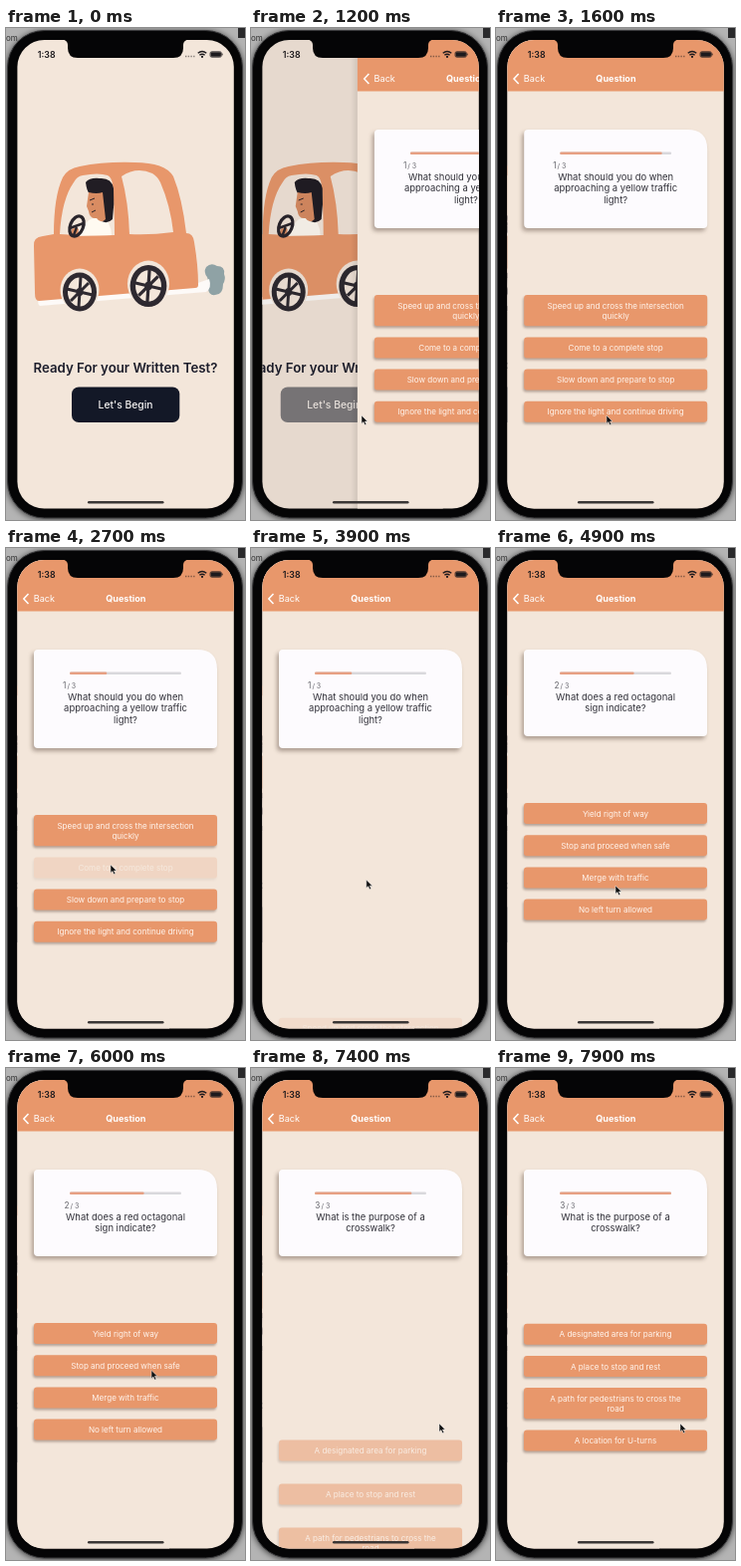
These frames come from a looping animation (240 px wide and 494 px high, 8 s). An HTML page:

```html
<!DOCTYPE html>
<html lang="en">
<head>
<meta charset="utf-8">
<title>Written test quiz</title>
<style>
  html, body { margin: 0; width: 100%; height: 100%; overflow: hidden; background: #b4b4b4; }
  svg { display: block; width: 240px; height: 494px; font-family: Inter, "Open Sans", sans-serif; }
  .mid { text-anchor: middle; }
  .answer rect { fill: #e8976b; filter: drop-shadow(-1px 2px 1.2px rgba(70, 40, 30, .35)); }
  .answer text { fill: #fff5ee; font-size: 8.05px; }
  .prompt { fill: #303038; font-size: 9.45px; }
  .count { fill: #66666c; font-size: 8.3px; }
  .card { fill: #fdfbfe; filter: drop-shadow(-1.5px 3px 2px rgba(60, 40, 30, .38)); }
  .phone { filter: drop-shadow(0 1px 3px rgba(0, 0, 0, .7)); }
</style>
</head>
<body>
<svg viewBox="0 0 240 494">
  <defs>
    <clipPath id="screen"><rect x="11.4" y="12" width="217.4" height="470.6" rx="27"/></clipPath>
    <linearGradient id="edge">
      <stop offset="0" stop-color="#000" stop-opacity="0"/>
      <stop offset="1" stop-color="#000" stop-opacity=".1"/>
    </linearGradient>
    <g id="wheel">
      <ellipse cy="-2" rx="19.5" ry="21.5" fill="#f3e6da"/>
      <ellipse rx="17" ry="19.5" fill="#2e2930"/>
      <ellipse rx="12" ry="14.5" fill="#f3e6da"/>
      <path d="M1-15L-1 15M-13-3L13 3M-9 9L9-9" stroke="#2e2930" stroke-width="3"/>
      <ellipse rx="3.5" ry="4" fill="#2e2930"/>
    </g>
  </defs>

  <rect width="240" height="494" fill="#b4b4b4"/>
  <text x="0" y="13" font-size="8" fill="#333">om</text>
  <rect x="233" width="7" height="10" fill="#29292b"/>
  <rect class="phone" x="1.5" y="2.5" width="236" height="489.5" rx="37" fill="#050506" stroke="#3a3a3c"/>

  <g clip-path="url(#screen)">
    <g id="home">
      <rect x="11" y="12" width="218" height="471" fill="#f3e6da"/>
      <path d="M201 240q5-5 11-1q8 0 7 8q2 5-1 10q0 11-8 11q-6 1-7-6l-3-5q4-3 2-7q-4-5-1-10z" fill="#8fa2a5"/>
      <path d="M33 272l26-3l131-12l14-5q3 9-3 13l-61 5l-106 9q-3-2-1-7z" fill="#fdfaf8"/>
      <path d="M28 219q-1-9 9-10l11-2q0-38 9-57q5-9 17-11q25-5 55-4q31 0 39 14q9 22 13 57q7 0 8 9q4 24 4 43q0 3-3 3l-157 13q-4 0-4-8z" fill="#e8976b"/>
      <path d="M54 207q2-35 14-52q3-6 9-7q16-3 25 0q4 2 5 9q2 24 2 51q-29 1-55-1z" fill="#f3e6da"/>
      <path d="M116 149q15-10 31-3q5 3 8 9q10 23 13 50q-23 3-44 2q-1-32-8-58z" fill="#f3e6da"/>
      <path d="M87 191q13-1 16 5q3 6 3 12l-38 1q2-8 10-9q3-7 9-9z" fill="#fffaf1"/>
      <path d="M80 155q4-5 14-4q12-1 14 10q1 16-1 31q-5 5-11 2l-5-24q-9 1-11-15z" fill="#211d24"/>
      <path d="M83 165q8 2 14 0l3 27q-5 5-9-1q-7 1-8-7l-2-5z" fill="#d98c62"/>
      <path d="M84 173l5-2M86 177h2M86 185l4-2" stroke="#2b2228" fill="none"/>
      <path d="M64 209l2-7q4-3 7 0l-1 8z" fill="#d98c62"/>
      <g fill="none" stroke="#29242b" stroke-width="3.2">
        <ellipse cx="71" cy="199" rx="6.5" ry="10.5" transform="rotate(22 71 199)"/>
        <path d="M64 201l14-5M71 200l-3 8" stroke-width="2.4"/>
      </g>
      <use href="#wheel" x="74" y="265"/>
      <use href="#wheel" transform="translate(143 259) scale(1.08)"/>
      <text class="mid" x="120" y="346" font-size="13.25" font-weight="600" fill="#1c1d2b">Ready For your Written Test?</text>
      <g id="begin">
        <rect x="66" y="360.5" width="108.3" height="35.5" rx="7" fill="#131827"/>
        <text class="mid" x="120" y="382.2" font-size="10.3" font-weight="500" fill="#f6f4f3">Let's Begin</text>
      </g>
    </g>
    <rect id="dim" x="11" y="12" width="218" height="471"/>

    <g id="quiz">
      <rect x="4" y="12" width="7.5" height="471" fill="url(#edge)"/>
      <rect x="11" y="12" width="218" height="471" fill="#f3e6da"/>
      <rect x="11" y="12" width="218" height="51.5" fill="#e8976b"/>
      <path d="M22.5 46l-4.7 5l4.7 5" fill="none" stroke="#fff" stroke-width="1.5"/>
      <g fill="#fff">
        <text x="27.7" y="54.3" font-size="9.1">Back</text>
        <text class="mid" x="120.3" y="54.3" font-size="9.1" font-weight="700">Question</text>
      </g>
      <g id="questions"></g>
      <rect x="64" y="124.5" width="112" height="2.6" rx="1.3" fill="#d9d8dc"/>
      <rect id="bar" x="64" y="124.5" height="2.6" rx="1.3" fill="#e7a083"/>
    </g>

    <g fill="#1d1a1d">
      <text x="31.8" y="29.6" font-size="8.8" font-weight="600">1:38</text>
      <path d="M180 28.5h10" stroke="#1d1a1d" stroke-opacity=".5" stroke-width="1.3" stroke-dasharray="1.4 1.3"/>
      <g fill="none" stroke="#1d1a1d" stroke-width="1.4">
        <path d="M192.7 25.3q4.3-3.6 8.6 0M194.4 27.3q2.6-2.2 5.2 0"/>
        <rect x="205" y="23.7" width="11.4" height="5.6" rx="1.7" stroke-width=".7"/>
      </g>
      <circle cx="197" cy="28.9" r="1.1"/>
      <rect x="205.5" y="24.2" width="10.4" height="4.6" rx="1"/>
      <path d="M217.2 25.6v1.8" stroke="#1d1a1d" stroke-width=".8"/>
      <rect x="82" y="475" width="76.5" height="2.6" rx="1.3" fill="#3a3635"/>
    </g>
    <path d="M55 11Q62 12 62 17V20Q62 30 72 30H168Q178 30 178 20V17Q178 12 185 11Z" fill="#050506"/>
  </g>
  <path id="cursor" d="M0 0v8.2l1.9-1.7l1.4 3.1l1.5-.7l-1.4-2.9h2.6z" fill="#111" stroke="#eee" stroke-width=".5"/>
</svg>

<script>
const LOOP = 8000;
const $ = id => document.getElementById(id);
const clamp = x => Math.min(1, Math.max(0, x));
const phase = (t, from, to) => clamp((t - from) / (to - from));
const mix = (a, b, p) => a + (b - a) * p;
const inOut = x => x < .5 ? 2 * x * x : 1 - 2 * (1 - x) ** 2;
const outCubic = x => 1 - (1 - x) ** 3;

const questions = [
  { top: 268, height: 99, left: 57, enter: -1000, exit: 3500, press: [2550, 2800],
    prompt: ["What should you do when", "approaching a yellow traffic", "light?"],
    answers: [["Speed up and cross the intersection", "quickly"], ["Come to a complete stop"],
      ["Slow down and prepare to stop"], ["Ignore the light and continue driving"]] },
  { top: 256, height: 87, left: 58.5, enter: 4062, exit: 6450, press: [6080, 6250],
    prompt: ["What does a red octagonal", "sign indicate?"],
    answers: [["Yield right of way"], ["Stop and proceed when safe"],
      ["Merge with traffic"], ["No left turn allowed"]] },
  { top: 256.7, height: 87, left: 64.3, enter: 7000, exit: 9000, press: [9000, 9000],
    prompt: ["What is the purpose of a", "crosswalk?"],
    answers: [["A designated area for parking"], ["A place to stop and rest"],
      ["A path for pedestrians to cross the", "road"], ["A location for U-turns"]] }
];

const centred = (lines, y, step) => lines.map((line, i) =>
  `<text class="mid" x="120" y="${y + i * step}">${line}</text>`).join("");

function answerMarkup(lines, y, height) {
  return `<g class="answer"><rect x="28" y="${y}" width="184" height="${height}" rx="3"/>
    ${centred(lines, y + 13.6, 10.2)}</g>`;
}

function questionMarkup(q, index) {
  let y = q.top;
  const answers = q.answers.map(lines => {
    const height = lines.length > 1 ? 31.2 : 21;
    const markup = answerMarkup(lines, y, height);
    y += height + 11.2;
    return markup;
  }).join("");
  const bottom = 102 + q.height;
  return `<g>
    <path class="card" d="M32 102H192Q212 102 212 122V${bottom - 4}q0 4-4 4H32q-4 0-4-4V106q0-4 4-4z"/>
    <text class="count" x="${q.left}" y="141">${index + 1}<tspan dx="1" font-size="7">/ 3</tspan></text>
    <g class="prompt">${centred(q.prompt, 152.5, 11.9)}</g>${answers}</g>`;
}

$("questions").innerHTML = questions.map(questionMarkup).join("");
questions.forEach((q, i) => {
  q.node = $("questions").children[i];
  q.buttons = [...q.node.querySelectorAll(".answer")];
});

// Fades to 20 % on touch and recovers after release.
function pressOpacity(t, [down, up]) {
  return t < up ? mix(1, .2, phase(t, down, down + 100)) : mix(.2, 1, phase(t, up, up + 250));
}

const cursorPath = [ // time, x, y
  [300, 50, 425], [800, 111, 389], [1750, 111, 389], [2450, 105, 318], [3400, 105, 318],
  [4200, 120, 339], [4900, 120, 339], [5800, 146, 303.5], [6400, 146, 303.5],
  [7200, 189, 357], [7500, 189, 357], [7900, 185, 357], [8000, 185, 357]
];

function cursorAt(t) {
  const next = Math.max(1, cursorPath.findIndex(k => k[0] >= t));
  const [t0, x0, y0] = cursorPath[next - 1], [t1, x1, y1] = cursorPath[next];
  const p = inOut(phase(t, t0, t1));
  return [mix(x0, x1, p), mix(y0, y1, p)];
}

function barLevel(t) {
  let level = mix(1, 1 / 3, inOut(phase(t, 1400, 2200)));
  for (const q of questions.slice(1)) {
    level += (1 - (1 - phase(t, q.enter, q.enter + 800)) ** 1.35) / 3;
  }
  return level;
}

function drawQuestions(t) {
  const current = questions.filter(q => t >= q.enter).pop();
  for (const q of questions) q.node.style.display = q === current ? "" : "none";
  const shown = inOut(phase(t, current.enter, current.enter + 800))
    - inOut(phase(t, current.exit, current.exit + 540));
  current.buttons.forEach((button, i) => {
    button.setAttribute("transform", `translate(0 ${(1 - shown) * 23.5 * (10 + i)})`);
    button.style.opacity = shown * (i === 1 ? pressOpacity(t, current.press) : 1);
  });
}

function draw(t) {
  const push = outCubic(phase(t, 1058, 1658));
  $("home").setAttribute("transform", `translate(${-65 * push} 0)`);
  $("dim").setAttribute("opacity", .1 * push);
  $("quiz").setAttribute("transform", `translate(${217 * (1 - push)} 0)`);
  $("quiz").style.display = push > 0 ? "" : "none";
  $("begin").style.opacity = pressOpacity(t, [950, 1100]);
  $("bar").setAttribute("width", 112 * barLevel(t));
  drawQuestions(t);
  $("cursor").style.display = t < 300 ? "none" : "";
  $("cursor").setAttribute("transform", `translate(${cursorAt(t)})`);
}

const start = performance.now();
function frame() {
  draw((performance.now() - start) % LOOP);
  requestAnimationFrame(frame);
}
frame();
</script>
</body>
</html>
```
